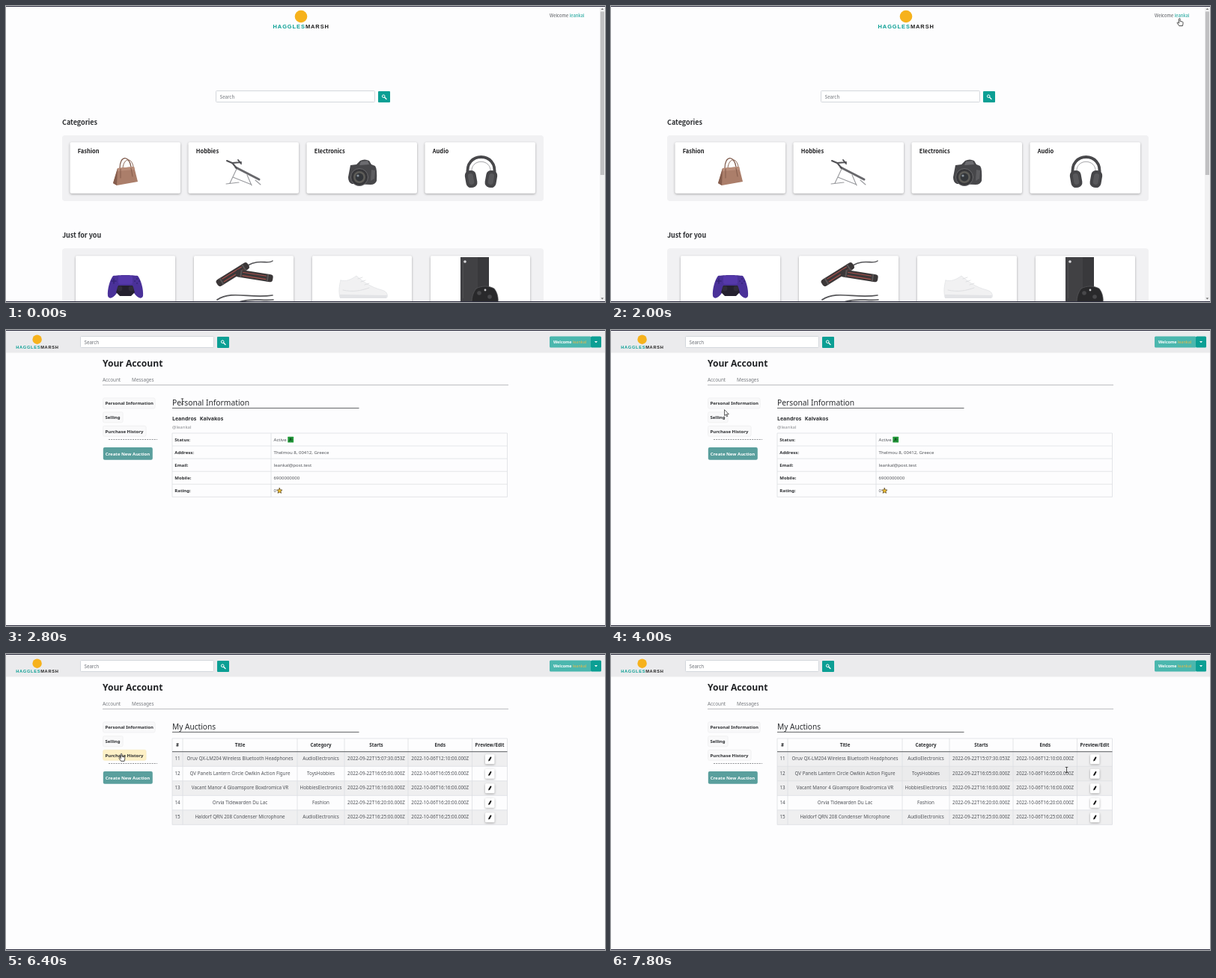
Animation, 800 px wide and 396 px high, one loop 8000 ms. Source, as an HTML page:

```html
<!DOCTYPE html>
<html lang="en">
<head>
<meta charset="utf-8">
<title>Auction site tour</title>
<style>
  html, body { margin: 0; width: 100%; height: 100%; overflow: hidden; background: #fdfdfe; }
  svg { display: block; width: 100vw; height: 100vh; }
  text { font-family: "Noto Sans", "Open Sans", sans-serif; fill: #2b2d30; white-space: pre; }
  .home text { font-family: "Noto Sans CJK JP", "Noto Sans CJK SC", "Noto Sans CJK", "Noto Sans", sans-serif; }
  svg .brand { font-family: "Liberation Sans", Arial, sans-serif; font-weight: 700; }
  .bold { font-weight: 700; }
  .semi { font-weight: 600; }
  .mid { text-anchor: middle; }
  .card { fill: #fff; filter: drop-shadow(0 1px 1.5px rgba(0, 0, 0, .32)); }
  .menu { fill: #f9f9fa; stroke: #ececee; stroke-width: .7; }
  .menu.on { fill: #fdf0c6; stroke: #f7ebc4; }
  .create { fill: #5a9f9d; }
  .create.on { fill: #448886; }
  .row.on { fill: #ebebec; }
  .line { fill: none; stroke: #dcdfe3; stroke-width: .8; }
</style>
</head>
<body>
<svg id="stage" viewBox="0 0 800 396" preserveAspectRatio="none"></svg>
<script>
const TEAL = '#0b9f94', LOOP = 8000, STEP = 200;
const ACCOUNT_OPENS = 2200, AUCTIONS_OPEN = 5000;

const rect = (x, y, w, h, fill, extra = '') =>
  `<rect x="${x}" y="${y}" width="${w}" height="${h}" ${fill ? `fill="${fill}"` : ''} ${extra}/>`;
const text = (x, y, size, str, cls = '', fill = '') =>
  `<text x="${x}" y="${y}" font-size="${size}" class="${cls}" ${fill ? `style="fill:${fill}"` : ''}>${str}</text>`;
const path = (d, fill, stroke = 'none', width = 1) =>
  `<path d="${d}" fill="${fill}" stroke="${stroke}" stroke-width="${width}" stroke-linecap="round" stroke-linejoin="round"/>`;
const circle = (x, y, r, fill, stroke = 'none', width = 1) =>
  `<circle cx="${x}" cy="${y}" r="${r}" fill="${fill}" stroke="${stroke}" stroke-width="${width}"/>`;
const line = d => `<path class="line" d="${d}"/>`;
const group = (id, body, cls = '') => `<g id="${id}" class="${cls}">${body}</g>`;
const at = (x, y, body) => `<g transform="translate(${x} ${y})">${body}</g>`;

const brand = (cx, cy, r, x, y, size, gap) =>
  circle(cx, cy, r, '#f6b21c') +
  `<text class="brand" x="${x}" y="${y}" font-size="${size}" letter-spacing="${gap}" style="fill:${TEAL}">HAGGLES<tspan fill="#222">MARSH</tspan></text>`;

const searchBar = (x, y, w, buttonX) =>
  rect(x, y, w, 15, '#fff', 'stroke="#d3d7dc" rx="1"') +
  text(x + 5, y + 10, 6.2, 'Search', '', '#6c7076') +
  rect(buttonX, y + .5, 16, 15, TEAL, 'rx="1"') +
  at(buttonX + 7.2, y + 7.2, circle(0, 0, 1.8, 'none', '#fff', 1) + path('M1.5 1.5L3.8 3.8', 'none', '#fff', 1.3));

// Product pictures
const bag =
  path('M152 217C152 200 164 199 167 215', 'none', '#7d5849', 1.3) +
  path('M156 217C157 203 168 202 170 215', 'none', '#8a6554', 1) +
  path('M149 217L171 215L176 235L148 240L143 237Z', '#ab7e6a') +
  path('M149 217L171 215L172 219L149 221Z', '#b98d79') +
  path('M149 217L148 240L143 237Z', '#855d4d') +
  path('M153 218L153 230M167 217L169 228', 'none', '#855d4d', 1);
const bench =
  path('M307 216L338 232', 'none', '#68686c', 3) +
  path('M308 218L299 237M322 226L328 240M294 238L311 236M303 229L328 239M333 233L340 239', 'none', '#98999d', 1.1) +
  path('M295 207L302 210L314 209M303 211L308 217M310 206L314 211', 'none', '#505054', 2);
const camera =
  path('M460 213L468 212L473 207Q479 204 485 207L488 212L493 214Q496 218 495 234Q493 239 487 239L462 238Q457 236 457 229Z', '#47474a') +
  path('M474 208L483 207L485 212L472 213Z', '#6c6c70') +
  circle(472, 229, 11.5, '#37373a', '#69696c', 1) + circle(472, 229, 8, '#5d5c58') +
  circle(472, 229, 5.4, '#33363a') + circle(470, 227, 1.6, '#8a949e') +
  path('M488 219L493 220L492 231L487 234Z', '#5d5d60');
const earCup = (x, tilt) => at(x, 231, `<g transform="rotate(${tilt})">` +
  rect(-7.5, -11, 15, 23, '#454548', 'rx="6.5"') + rect(-3.5, -7, 7, 15, '#58585b', 'rx="3.5"') + '</g>');
const headphones =
  path('M617 226C611 194 658 194 652 226', 'none', '#48484b', 3.8) +
  path('M622 221C621 204 648 204 647 221', 'none', '#8a8a8d', .8) +
  earCup(621, -10) + earCup(648, 10);
const gamepad =
  path('M143 361C150 359.5 169 359.5 176 361C180 366 184 379 183 388C181 393 176 391 171 384L148 384C143 391 138 393 136 388C135 379 139 366 143 361Z', '#4a3199') +
  path('M150 374L169 374L172 383L167 388L152 388L147 383Z', '#24202f') +
  rect(150, 361, 19, 11, '#5538aa', 'rx="2"') +
  circle(152, 378, 3.4, '#302c3a') + circle(167, 378, 3.4, '#302c3a') +
  path('M144 365V371M141 368H147', 'none', '#37257a', 1.7) +
  [[175, 365], [175, 371], [172, 368], [178, 368]].map(p => circle(...p, 1, '#37257a')).join('');
const grip = (x, y, angle, length) => at(x, y, `<g transform="rotate(${angle})">` +
  rect(0, -5, length, 10, '#3b3738', 'rx="3.5"') +
  rect(9, -2.8, length - 18, 1.2, '#a5504c') + rect(9, 1.6, length - 18, 1.2, '#a5504c') +
  rect(6, -5, 2, 10, '#5a5556') + rect(length - 8, -5, 2, 10, '#5a5556') + '</g>');
const rope =
  path('M323 347C338 338 350 346 356 341', 'none', '#555558', 1.6) +
  path('M282 393C302 380 326 392 356 387M311 396C328 390 342 395 357 393', 'none', '#555558', 1.7) +
  grip(282, 372, -32, 49) + grip(307, 357, 9, 50);
const sneaker =
  path('M447 367C454 369 461 366 468 361C477 369 487 376 502 380C509 382 510 386 509 390L446 390C444 382 445 374 447 367Z', '#f1f1f2', '#e0e1e4', .7) +
  path('M446 386L509 387L508 391L446 391Z', '#e2e3e6') +
  path('M470 365L476 363M474 369L480 367M479 373L485 371M450 380C463 383 474 381 485 377', 'none', '#dadbde', .8);
const consoleBox =
  rect(607, 336, 38, 60, '#414144') + rect(630, 336, 15, 60, '#39393c') +
  rect(610, 341, .8, 50, '#505053') + circle(613, 342, 1.8, '#d9d9dc') +
  path('M628 378C635 374 645 374 652 378C656 383 658 390 657 397H622C622 389 624 383 628 378Z', '#29292b', '#58585b', .7) +
  circle(632, 384, 2.8, '#48484b') + circle(646, 389, 2.8, '#48484b') + circle(640, 380, 1.4, '#c9c9cc');

const categories = ['Fashion', 'Hobbies', 'Electronics', 'Audio'];
const home =
  brand(394, 14, 8.3, 356.5, 30, 7.5, .9) +
  text(726, 15.2, 5.9, `Welcome <tspan fill="${TEAL}">leankal</tspan>`, '', '#55585c') +
  searchBar(280.5, 113.5, 212, 497) +
  text(75, 158.6, 9, 'Categories', 'bold') +
  rect(75, 173, 643, 88, '#f1f1f3', 'rx="4"') +
  categories.map((name, i) => rect(85.5 + 158 * i, 182.3, 147.5, 68.5, '', 'rx="2" class="card"') +
    text(95.8 + 158 * i, 196.8, 7.5, name, 'bold', '#1b1b1d')).join('') +
  bag + bench + camera + headphones +
  text(75, 310.3, 9, 'Just for you', 'bold') +
  rect(75, 324.3, 643, 80, '#f1f1f3', 'rx="4"') +
  categories.map((_, i) => rect(93 + 158 * i, 334.3, 133, 70, '', 'rx="1.5" class="card"')).join('') +
  gamepad + rope + sneaker + consoleBox +
  rect(793, 1, 7, 394, '#f1f1f2') + rect(793.8, 7.5, 5.2, 218.5, '#c0c0c2') +
  path('M794.5 5L796.4 3L798.3 5Z', '#777') + path('M794.5 390.5L796.4 392.5L798.3 390.5Z', '#666');

const button = (id, y, w, label) =>
  rect(129.6, y, w, 14, '', `rx="2" class="menu" id="${id}"`) + text(132.5, y + 9.2, 6, label, 'semi');
const account =
  rect(0, 1, 800, 29.5, '#ebebed') +
  brand(41.6, 12.7, 6.2, 13.3, 25, 5.7, .68) + searchBar(99.5, 8.5, 178, 282) +
  rect(726, 8.5, 55.5, 15, '#4bb7ae', 'rx="1.5"') + rect(781, 8.5, 14, 15, TEAL, 'rx="1.5"') +
  text(731, 18, 5.4, 'Welcome', 'semi', '#fff') + text(756.8, 18, 5.5, 'leankal', '', '#e9b949') +
  path('M786 15L790 15L788 17.2Z', '#fff') +
  text(129, 49, 12.1, 'Your Account', 'semi', '#202225') +
  text(129, 69.3, 6.35, 'Account', '', '#777a7e') + text(168, 69.3, 6.35, 'Messages', '', '#777a7e') +
  rect(129, 73.2, 542, .9, '#b4b5b7') +
  button('personal', 91, 69.5, 'Personal Information') +
  button('selling', 109.8, 26.5, 'Selling') +
  button('history', 128.3, 57.5, 'Purchase History') +
  '<path d="M137 146.5H202" stroke="#77797c" stroke-width=".8" stroke-dasharray="2 1.2"/>' +
  rect(129.8, 157, 66, 16.8, '', 'rx="2" class="create" id="create"') +
  text(132.7, 167.6, 6, 'Create New Auction', 'semi', '#fff') +
  rect(222, 104, 249.5, .9, '#55575a');

const starPoints = Array.from({ length: 10 }, (_, i) => {
  const r = i % 2 ? 1.7 : 3.8, a = i * Math.PI / 5;
  return [365.3 + r * Math.sin(a), 215.2 - r * Math.cos(a)].map(v => v.toFixed(2)).join(' ');
});
const details = [['Status:', 'Active'], ['Address:', 'Thelmou 8, 00412, Greece'],
  ['Email:', 'leankal@post.test'], ['Mobile:', '6900000000'], ['Rating:', '0']];
const info =
  text(222, 101, 10.3, 'Personal Information') +
  text(222, 120.8, 7, 'Leandros', 'bold') + text(258.8, 120.8, 7, 'Kalvakos', 'bold') +
  text(222, 132.2, 6, '@leankal', '', '#898b8f') +
  line('M222 138H669.5V223.3H222ZM354 138V223.3' + [1, 2, 3, 4].map(i => `M222 ${138 + 17.06 * i}H669.5`).join('')) +
  details.map(([key, value], i) => text(225.3, 148.7 + 17.06 * i, 6, key, 'bold') +
    text(357.6, 148.7 + 17.06 * i, 6.05, value, '', '#505358')).join('') +
  rect(376.3, 142.7, 7.8, 7.8, '#239b3b', 'rx=".6"') +
  path('M380.8 144.4L379.6 146.8L381.4 148.8M379.7 146.4L378 149M379 145.3L382 146.5', 'none', '#10451d', .9) +
  path('M' + starPoints.join('L') + 'Z', '#f6c333', '#4b3c1c', .7);

const columns = [222, 236, 389, 452, 537, 622.5, 669.5];
const center = i => (columns[i] + columns[i + 1]) / 2;
const rowTop = i => 130.8 + 19.5 * i;
const items = [
  ['Oruv QX-LM204 Wireless Bluetooth Headphones', 'AudioElectronics', '15:07:30.053', '12:10:00'],
  ['QV Panels Lantern Circle Owlkin Action Figure', 'ToysHobbies', '16:05:00.000', '16:05:00'],
  ['Vacant Manor 4 Gloamspore Boxdromica VR', 'HobbiesElectronics', '16:16:00.000', '16:16:00'],
  ['Orvia Tidewarden Du Lac', 'Fashion', '16:20:00.000', '16:20:00'],
  ['Haldorf QRN 208 Condenser Microphone', 'AudioElectronics', '16:25:00.000', '16:25:00']];
const itemRow = ([title, kind, start, end], i) =>
  rect(222, rowTop(i), 447.5, 19.5, i % 2 ? '#fdfdfe' : '#efeff0', `class="row" id="row${i}"`) +
  [11 + i, title, kind, `2022-09-22T${start}Z`, `2022-10-06T${end}.000Z`]
    .map((cell, c) => text(center(c), rowTop(i) + 11.3, 6.25, cell, 'mid', '#505358')).join('') +
  rect(640, rowTop(i) + 3.4, 12.5, 13, '', 'rx="1.5" class="card"') +
  at(646.2, rowTop(i) + 9.9, path('M1.2 -2.2L-.6 1.1', 'none', '#161616', 2) + path('M-1.7 .5L.2 1.6L-1.8 3Z', '#161616'));
const auctions =
  text(222, 101, 10.15, 'My Auctions') +
  ['#', 'Title', 'Category', 'Starts', 'Ends', 'Preview/Edit']
    .map((name, c) => text(center(c), 124.2, 6.2, name, 'bold mid')).join('') +
  items.map(itemRow).join('') +
  line('M222 113H669.5' + columns.map(x => `M${x} 113V228.3`).join('') +
    [1, 2, 3, 4, 5].map(i => `M222 ${rowTop(i)}H669.5`).join('')) +
  rect(222, 130.2, 447.5, 1, '#5a5c5f');

const cursors = {
  arrow: path('M0 0V7.6L1.8 6L3 8.8L4.2 8.3L3 5.6H5.4Z', '#fff', '#222', .7),
  hand: path('M-.9 .6C-.9 -.5 .9 -.5 .9 .6V3.6L4.2 4.4C5 4.7 5 6.6 4.1 9.8H-.5L-3 6C-3.4 5 -2.2 4.7 -.9 6Z', '#fff', '#222', .8),
  beam: path('M-1.4 -3.5H1.4M0 -3.5V3.5M-1.4 3.5H1.4', 'none', '#333', .8)
};

const stage = document.getElementById('stage');
stage.innerHTML = rect(0, 0, 800, 396, '#fdfdfe') +
  group('home', home, 'home') + group('account', account) + group('info', info) + group('auctions', auctions) +
  rect(0, 0, 800, 1, '#2c2c3e') + rect(0, 395, 800, 1, '#2c2c3e') +
  group('cursor', Object.entries(cursors).map(([id, body]) => group(id, body)).join(''));

// Pointer stops: time, x, y, shape
const stops = [
  [200, 160, 386, 'arrow'], [1200, 701, 114, 'arrow'], [1800, 761.5, 14.5, 'hand'],
  [2200, 757, 19, 'hand'], [2400, 448, 63, 'arrow'], [2800, 235.5, 95.5, 'beam'],
  [3000, 160, 98, 'hand'], [3200, 160, 172, 'hand'], [3600, 396, 140, 'arrow'], [3800, 155, 91.5, 'hand'],
  [4000, 151.5, 107, 'arrow'], [4400, 158, 172, 'hand'], [4800, 150, 117, 'hand'],
  [5200, 150.5, 116, 'hand'], [5800, 151, 117, 'hand'], [6200, 154, 133.5, 'hand'], [6600, 154, 133.5, 'hand'],
  [6800, 205, 195, 'arrow'], [7000, 420, 211, 'beam'], [7200, 607, 210.5, 'arrow'],
  [7600, 607, 120, 'beam'], [7800, 608.5, 155, 'beam']];
const hoverable = [...stage.querySelectorAll('.menu, .create, .row')];
const byId = id => document.getElementById(id);
const show = (id, on) => byId(id).style.display = on ? '' : 'none';

function pointer(t) {
  const i = stops.findLastIndex(s => s[0] <= t);
  if (i < 0) return null;
  const a = stops[i], b = stops[i + 1] || a;
  const k = b === a ? 0 : (t - a[0]) / (b[0] - a[0]);
  return { x: a[1] + (b[1] - a[1]) * k, y: a[2] + (b[2] - a[2]) * k, shape: a[3] };
}

function isOver(el, p) {
  const dx = p.x - el.x.baseVal.value, dy = p.y - el.y.baseVal.value;
  return dx >= 0 && dy >= 0 && dx < el.width.baseVal.value && dy < el.height.baseVal.value;
}

function draw() {
  const t = Math.floor(performance.now() % LOOP / STEP) * STEP;
  const p = pointer(t);
  show('home', t < ACCOUNT_OPENS);
  show('account', t >= ACCOUNT_OPENS);
  show('info', t >= ACCOUNT_OPENS && t < AUCTIONS_OPEN);
  show('auctions', t >= AUCTIONS_OPEN);
  show('cursor', p);
  if (p) {
    byId('cursor').setAttribute('transform', `translate(${p.x} ${p.y})`);
    Object.keys(cursors).forEach(id => show(id, id === p.shape));
  }
  hoverable.forEach(el => el.classList.toggle('on', !!p && isOver(el, p)));
  requestAnimationFrame(draw);
}
draw();
</script>
</body>
</html>
```
